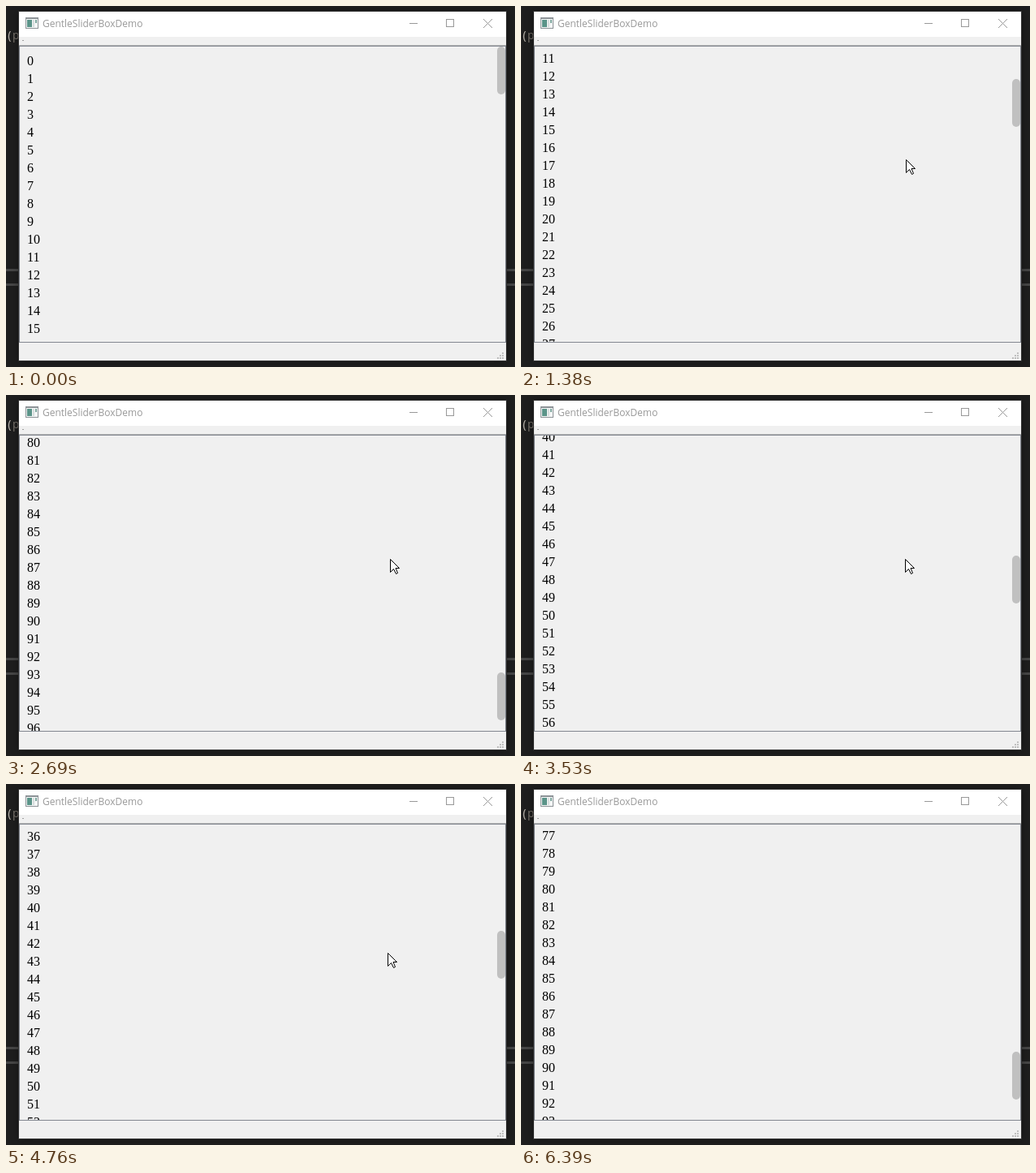
These frames come from a looping animation (627x445 px, 6770 ms). An HTML page with a canvas:

```html
<!DOCTYPE html>
<html lang="en">
<head>
<meta charset="utf-8">
<title>Scrolling list</title>
<style>
  html, body { margin: 0; width: 100%; height: 100%; overflow: hidden; background: #1e1e1e; }
  canvas { display: block; }
</style>
</head>
<body>
<canvas id="stage" width="627" height="445"></canvas>
<script>
const ctx = document.getElementById('stage').getContext('2d');
const LOOP = 6770, STEP = 76.77; // ms; the picture refreshes once per step
const ROWS = 100, PITCH = 22, MAX_SCROLL = 1850;
const VIEW = { x: 17, y: 50, w: 598, h: 364 };
const THUMB = 59;

// a > 1 softens the start, b > 1 softens the end.
const ease = (u, a, b) => 1 - (1 - u ** a) ** b;

// Progress of an eased move between two steps, from 0 to 1.
function move(k, from, to, a = 1, b = 1) {
  return ease(Math.min(1, Math.max(0, (k - from) / (to - from))), a, b);
}

// Down to the end, most of the way back up, then down again.
function scrollAt(k) {
  return Math.round(
    MAX_SCROLL * move(k, 9, 37, 2.2, 1.653)
    - 1580 * move(k, 39, 54, 1, 1.473)
    + 1428 * move(k, 54, 77, 1.825, 2.914));
}

// In from below, two small drifts, a glide down and out again.
function cursorAt(k) {
  const enter = move(k, 0, 18, 1, 6), rest = move(k, 18, 35), drift = move(k, 46, 62);
  const glide = move(k, 62, 72), leave = move(k, 78, 83);
  return [
    588 - 114 * enter - rest - 3 * drift - 10 * glide + 138 * leave,
    523 - 334 * enter + 13 * rest + 6 * drift + 76 * glide + 186 * leave
  ].map(Math.round);
}

function rect(color, x, y, w, h) {
  ctx.fillStyle = color;
  ctx.fillRect(x, y, w, h);
}

function frame(color, x, y, w, h) {
  ctx.strokeStyle = color;
  ctx.lineWidth = 1;
  ctx.strokeRect(x + 0.5, y + 0.5, w - 1, h - 1);
}

function text(str, x, y, font, color) {
  ctx.font = font;
  ctx.fillStyle = color;
  ctx.fillText(str, x, y);
}

function drawBackdrop() {
  rect('#1e1e1e', 0, 0, 627, 445);
  rect('#464646', 0, 324, 627, 3);
  rect('#464646', 0, 342, 627, 3);
  const mono = '14px "Noto Sans Mono", monospace';
  text('(', 0, 41, mono, '#b9b4ac');
  text('p', 8, 41, mono, '#77716a');
}

function drawWindow() {
  ctx.save();
  ctx.shadowColor = 'rgba(0,0,0,.45)';
  ctx.shadowBlur = 10;
  rect('#f0f0f0', 16, 7, 600, 430);
  ctx.restore();
  frame('#343434', 15, 6, 602, 432);

  rect('#fff', 16, 7, 600, 31);
  drawIcon();
  text('GentleSliderBoxDemo', 45, 26, '12px "Open Sans", sans-serif', '#999');
  drawButtons();

  rect('#a0a0a0', 20, 42, 2, 1);
  rect('#b4b4b4', 16, 48, 600, 1);
  frame('#828790', 16, 49, 600, 366);

  for (let r = 0; r < 3; r++)
    for (let c = 2 - r; c < 3; c++) rect('#bfbfbf', 605 + c * 3, 427 + r * 3, 2, 2);
}

function drawIcon() {
  rect('#8c9296', 24, 14, 16, 14);
  rect('#f4f6f6', 25, 16, 14, 11);
  rect('#5b9489', 26, 17, 6, 9);
  rect('#d5dddd', 33, 17, 2, 9);
  rect('#7fa79f', 36, 17, 2, 4);
}

function drawButtons() {
  rect('#999', 497, 21, 10, 1);
  frame('#999', 542, 16, 10, 10);
  ctx.beginPath();
  ctx.moveTo(588, 16);
  ctx.lineTo(599, 27);
  ctx.moveTo(599, 16);
  ctx.lineTo(588, 27);
  ctx.stroke();
}

function drawList(scroll) {
  ctx.save();
  ctx.beginPath();
  ctx.rect(VIEW.x, VIEW.y, VIEW.w, VIEW.h);
  ctx.clip();
  const first = Math.max(0, Math.floor(scroll / PITCH) - 1);
  for (let n = first; n < Math.min(ROWS, first + 20); n++)
    text(String(n), 26, 73 + n * PITCH - scroll, '16px "Liberation Serif", serif', '#000');

  const top = VIEW.y + Math.round(scroll / MAX_SCROLL * (VIEW.h - THUMB));
  ctx.fillStyle = '#c0c0c0';
  ctx.beginPath();
  ctx.roundRect(605, top, 10, THUMB, 5);
  ctx.fill();
  ctx.restore();
}

function drawCursor(x, y) {
  ctx.save();
  ctx.translate(x + 0.5, y + 0.5);
  const arrow = new Path2D('M0 0V16L4 12L7 18L9 17L6.5 11H11Z');
  ctx.fillStyle = '#fff';
  ctx.fill(arrow);
  ctx.strokeStyle = '#000';
  ctx.lineWidth = 1;
  ctx.stroke(arrow);
  ctx.restore();
}

function draw(time) {
  const k = Math.floor((time % LOOP + 7) / STEP);
  drawBackdrop();
  drawWindow();
  drawList(scrollAt(k));
  drawCursor(...cursorAt(k));
}

const start = performance.now();
function tick() {
  draw(performance.now() - start);
  requestAnimationFrame(tick);
}
tick();
</script>
</body>
</html>
```
